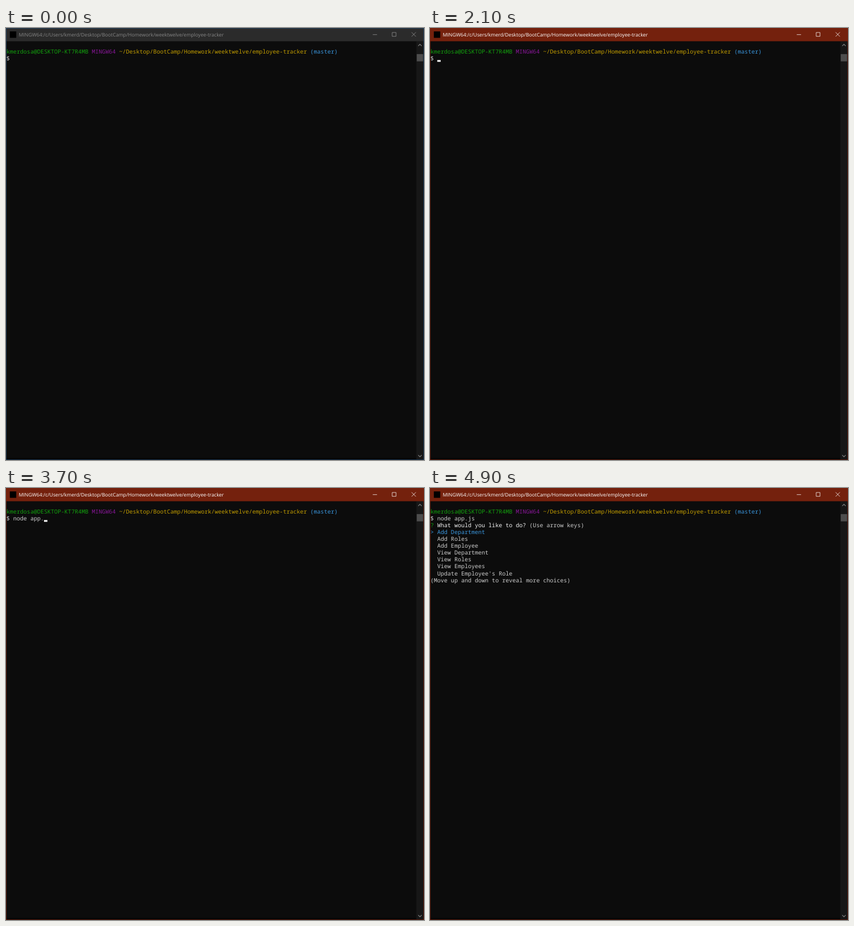
These frames come from a looping animation (737 by 760 pixels, 8 s). An HTML page:

```html
<!DOCTYPE html>
<html lang="en">
<head>
<meta charset="utf-8">
<title>Terminal</title>
<style>
  html, body { margin: 0; width: 737px; height: 760px; overflow: hidden; background: #0c0c0c; }
  svg { display: block; }
  text { white-space: pre; text-rendering: geometricPrecision; }
  .mono { font: 13.333px "Noto Sans Mono", "DejaVu Sans Mono", monospace; fill: #ccc; }
  #title { font: 11.55px "Open Sans", "Noto Sans", sans-serif; }
  .green { fill: #13a10e; }
  .purple { fill: #881798; }
  .yellow { fill: #c19c00; }
  .blue { fill: #3a96dd; }
  .bright { fill: #f2f2f2; }
</style>
</head>
<body>
<!-- The window is laid out in its own pixels and scaled down to the stage. -->
<svg width="737" height="760" viewBox="0 0 979 1010" preserveAspectRatio="none">
  <rect width="979" height="1010" fill="#0c0c0c"/>
  <rect x="1" y="1005" width="960" height="4" fill="#060606"/>
  <rect x="961" y="31" width="17" height="978" fill="#171717"/>
  <rect x="962" y="61" width="15" height="17" fill="#4d4d4d"/>
  <path d="M965.5 42l4-4 4 4M965.5 998.5l4 4 4-4" fill="none" stroke="#858585" stroke-width="1.5"/>
  <rect id="bar" width="979" height="31"/>
  <rect id="border" x=".5" y=".5" width="978" height="1009" fill="none"/>
  <rect x="9" y="8" width="15" height="15" fill="#000"/>
  <text id="title" x="30" y="20">MINGW64:/c/Users/kmerd/Desktop/BootCamp/Homework/weektwelve/employee-tracker</text>
  <path id="buttons" d="M859 15.5h10M904.5 10.5h9v9h-9zM950 10l10 10M960 10l-10 10" fill="none"/>
  <g id="prompt"></g>
  <text id="command" class="mono"></text>
  <g id="menu"></g>
  <rect id="cursor" width="8" height="4" fill="#fff"/>
</svg>
<script>
const LOOP = 8000, CELL = 8, ROW = 16, LEFT = 1, TOP = 31, ASCENT = 13;
const FOCUS_AT = 500, ENTER_AT = 4760, MENU_AT = 4900;
const COMMAND = "node app.js";
const KEY_TIMES = [2210, 2320, 2430, 2630, 2960, 3160, 3300, 3430, 3700, 3830, 4030];
const CURSOR_SPANS = [[1030, 1560], [2100, 4230], [ENTER_AT, MENU_AT]];

const $ = id => document.getElementById(id);
const set = (id, attrs) => {
  for (const key in attrs) $(id).setAttribute(key, attrs[key]);
};
const rowTop = row => TOP + row * ROW;

function addRow(parent, row, ...parts) {
  const ns = "http://www.w3.org/2000/svg";
  const text = document.createElementNS(ns, "text");
  text.setAttribute("class", "mono");
  text.setAttribute("x", LEFT);
  text.setAttribute("y", rowTop(row) + ASCENT);
  for (const [content, color = ""] of parts) {
    const span = document.createElementNS(ns, "tspan");
    span.setAttribute("class", color);
    span.textContent = content;
    text.append(span);
  }
  $(parent).append(text);
}

addRow("prompt", 1,
  ["kmerdosa@DESKTOP-KT7R4MB ", "green"],
  ["MINGW64 ", "purple"],
  ["~/Desktop/BootCamp/Homework/weektwelve/employee-tracker ", "yellow"],
  ["(master)", "blue"]);
set("command", { x: LEFT, y: rowTop(2) + ASCENT });

addRow("menu", 3, ["? ", "green"], ["What would you like to do? ", "bright"], ["(Use arrow keys)"]);
addRow("menu", 4, ["> Add Department", "blue"]);
["Add Roles", "Add Employee", "View Department", "View Roles", "View Employees", "Update Employee's Role"]
  .forEach((choice, i) => addRow("menu", 5 + i, ["  " + choice]));
addRow("menu", 11, ["(Move up and down to reveal more choices)"]);

function draw(t) {
  const focused = t >= FOCUS_AT;
  const typed = KEY_TIMES.filter(time => t >= time).length;
  const entered = t >= ENTER_AT;
  const cursorOn = CURSOR_SPANS.some(([from, to]) => t >= from && t < to);

  set("bar", { fill: focused ? "#74210d" : "#2b2b2b" });
  set("border", { stroke: focused ? "#74210d" : "#21466b" });
  set("title", { fill: focused ? "#fff" : "#868686" });
  set("buttons", { stroke: focused ? "#fff" : "#999" });
  $("command").textContent = "$ " + COMMAND.slice(0, typed);
  set("menu", { visibility: t >= MENU_AT ? "visible" : "hidden" });
  set("cursor", {
    x: LEFT + (entered ? 0 : 2 + typed) * CELL,
    y: rowTop(entered ? 3 : 2) + 12,
    visibility: cursorOn ? "visible" : "hidden"
  });
}

const start = performance.now();
function tick() {
  draw((performance.now() - start) % LOOP);
  requestAnimationFrame(tick);
}
tick();
</script>
</body>
</html>
```
